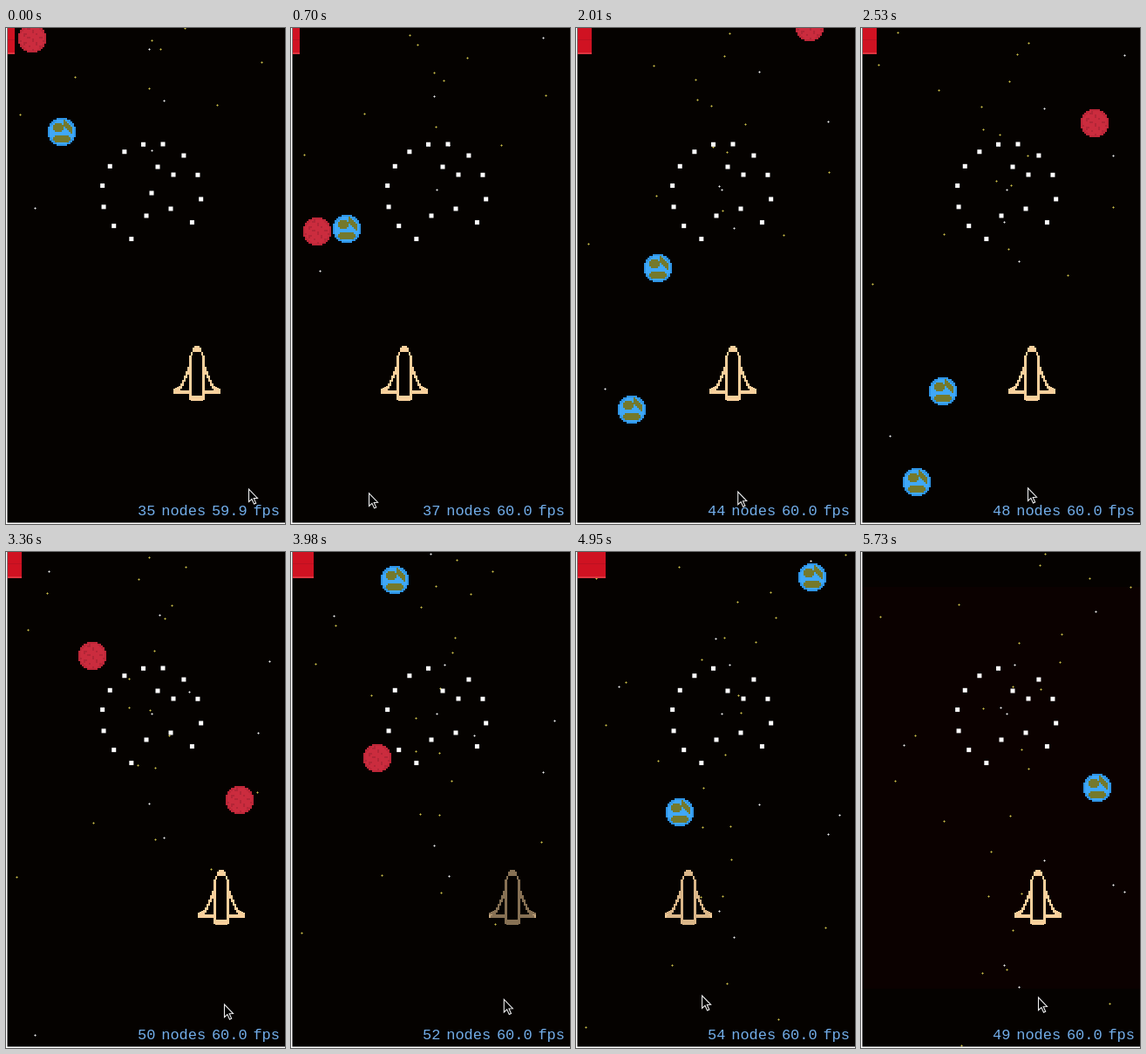
Recreate the animation shown at these times as an HTML page with a canvas. Size 320 px wide and 568 px high, loop 5.83 s.

```html
<!DOCTYPE html>
<html lang="en">
<head>
<meta charset="utf-8">
<title>Space shuttle</title>
<style>
  html, body { margin: 0; width: 100%; height: 100%; overflow: hidden; background: #050200; }
  canvas { display: block; }
</style>
</head>
<body>
<canvas id="stage" width="320" height="568"></canvas>
<script>
const ctx = document.getElementById('stage').getContext('2d');
const LOOP = 5830;
const SHIP_TOP = 364, SHIP_HALF = 27, SHIP_LAG = .15;
const RADIUS = 16, BLINK = .4;

// Key points as [seconds, value]
const POINTER = [[-.15, 219], [0, 278], [.9, 52], [1.245, 140], [1.395, 161], [2.379, 196], [2.529, 191],
  [3.21, 247], [3.36, 250], [3.82, 254], [3.97, 244], [4.45, 108], [4.78, 129], [4.93, 144], [5.57, 203]];
const NODES = [[0, 35], [1.395, 40], [2.529, 48], [3.36, 50], [3.97, 52], [4.93, 54], [5.717, 49]];

// Smooth curve through key points
function curve(t, keys) {
  const last = keys.length - 1;
  if (t >= keys[last][0]) return keys[last][1];
  let i = 0;
  while (t >= keys[i + 1][0]) i++;
  const slope = k => {
    const a = keys[Math.max(k - 1, 0)], b = keys[Math.min(k + 1, last)];
    return (b[1] - a[1]) / (b[0] - a[0]);
  };
  const [t0, v0] = keys[i], [t1, v1] = keys[i + 1];
  const d = t1 - t0, u = (t - t0) / d, w = 1 - u;
  return v0 * w * w * (1 + 2 * u) + v1 * u * u * (3 - 2 * u)
    + d * u * w * (slope(i) * w - slope(i + 1) * u);
}

const pointerX = t => curve(t, POINTER);
const pointerY = t => 521 + 13 * Math.cos((t - 1.2) * Math.PI / 3.8);
const shipX = t => pointerX(t - SHIP_LAG);

// A planet crosses y = 0 at its start time and is lost if it meets the ship.
const planets = [
  ['mars', 30, -.038, 317],
  ['earth', 64, -.75, 158.6],
  ['earth', 94, .982, 269],
  ['mars', 268, 2.011, 210.6],
  ['mars', 99, 2.739, 191.5],
  ['earth', 119, 3.855, 277],
  ['earth', 271, 4.836, 306.6],
].map(([kind, x, start, speed]) => {
  const meet = start + (SHIP_TOP - RADIUS) / speed;
  const hit = Math.abs(shipX(meet) - x) < RADIUS + SHIP_HALF;
  return { kind, x, start, speed, end: hit ? meet : Infinity };
});
const hits = planets.map(p => p.end).filter(isFinite);
const RESET = hits.pop();

// Dots: two arcs of a ring plus a few inside it
const dots = [[174, 159], [192, 168], [189, 207], [161, 215]];
function arc(from, to, count) {
  for (let i = 0; i < count; i++) {
    const a = (from + (to - from) * i / (count - 1)) * Math.PI / 180;
    const r = 57 + 2.5 * Math.sin(a);
    dots.push([167 + r * Math.cos(a), 187 + r * Math.sin(a)]);
  }
}
arc(113, 260, 7);
arc(-48, 37.5, 4);

// Dots that vanish when a falling star stops on them
const caught = [{ x: 167, y: 189, starX: 167, at: .47 }, { x: 180, y: 133, starX: 176, at: 3.96 }];

function seeded(seed) {
  return () => (seed = seed * 16807 % 2147483647) / 2147483647;
}

// Yellow stars drift and gather speed; white ones fall straight.
const random = seeded(4177);
const stars = [];
for (let born = -1.9; born < 5.8; born += .27)
  stars.push({ color: '#cfc24a', born, x: 8 + 304 * random(), drift: 16 * random() - 8, speed: 40 + 8 * random(), pull: 5.6 });
for (let born = -2; born < 5.6; born += .85)
  stars.push({ color: '#f0f0f0', born, x: 20 + 285 * random(), drift: 0, speed: 70 + 45 * random(), pull: 0 });

function rect(color, x, y, w, h) {
  ctx.fillStyle = color;
  ctx.fillRect(x, y, w, h);
}

function drawStar(x, y, color) {
  x = Math.round(x);
  y = Math.round(y);
  ctx.globalAlpha = .55;
  rect(color, x - 1, y, 3, 1);
  rect(color, x, y - 1, 1, 3);
  ctx.globalAlpha = 1;
  rect(color, x, y, 1, 1);
}

const drawDot = ({ x, y }) => rect('#fff', x - 2.5, y - 2.5, 5, 5);

const inOval = (x, y, rx, ry) => (x / rx) ** 2 + (y / ry) ** 2 < 1;
const SURFACE = {
  earth: {
    rim: '#2e94e6', fill: '#40a8f8', spot: '#74792c',
    marked: (x, y) => inOval(x + 4, y + 5, 7, 4.5) || inOval(x, y - 8, 10, 4.5)
      || Math.abs(x - y - 13) < 4 && Math.abs(x - 7) < 6,
  },
  mars: {
    rim: '#bd2738', fill: '#cb2c3e', spot: '#b22637',
    marked: (x, y) => Math.sin(x * .7 + 1) * Math.sin(y * .6 + x * .25) > .55,
  },
};

function drawPlanet({ kind, x, start, speed }, t) {
  const { rim, fill, spot, marked } = SURFACE[kind];
  const top = Math.round(speed * (t - start));
  for (let dy = -RADIUS; dy < RADIUS; dy += 2)
    for (let dx = -RADIUS; dx < RADIUS; dx += 2) {
      const cx = dx + 1, cy = dy + 1, r = Math.hypot(cx, cy);
      if (r > RADIUS) continue;
      rect(r > 14 ? rim : marked(cx, cy) ? spot : fill, x + dx, top + dy, 2, 2);
    }
}

function drawShip(x, alpha) {
  const part = (dx, dy, w, h) => rect('#f8d09c', x + dx, SHIP_TOP + dy, w, h);
  const pair = (dx, dy, w, h) => { part(dx, dy, w, h); part(-dx - w, dy, w, h); };
  ctx.globalAlpha = alpha;
  part(-3, 0, 6, 2);
  part(-5, 2, 10, 5);
  pair(-7, 7, 2, 4);
  pair(-9, 11, 3, 46);
  part(-9, 57, 18, 5);
  part(-7, 62, 14, 1);
  // Wing edge: steps that flatten outwards
  for (let i = 0; i < 8; i++) {
    const y = 24 + 24 * Math.sin(i / 7 * Math.PI / 2);
    pair(-11 - 2 * i, Math.round(y), 2, 9 - Math.round(i * .75));
  }
  pair(-27, 49, 2, 6);
  pair(-27, 51, 18, 4);
  ctx.globalAlpha = 1;
}

function drawPointer(x, y) {
  ctx.beginPath();
  for (const [dx, dy] of [[0, 0], [0, 14.5], [3.4, 11.4], [6, 17], [8.2, 16], [5.7, 10.5], [10, 10.3]])
    ctx.lineTo(x + dx + .5, y + dy);
  ctx.closePath();
  ctx.fillStyle = '#000';
  ctx.strokeStyle = '#eee';
  ctx.lineWidth = 1.1;
  ctx.fill();
  ctx.stroke();
}

function drawBar(level) {
  const w = 8 * level;
  rect('#d01222', 2, 0, w, 30);
  rect('#bc1121', 2, 13, w, 1);
  rect('#de3440', 2, 28, w, 2);
}

function drawStats(t) {
  ctx.font = '17px "Liberation Mono", "Courier New", monospace';
  ctx.wordSpacing = '-3.5px';
  ctx.textAlign = 'right';
  ctx.fillStyle = '#72aeea';
  ctx.fillText(`${Math.round(curve(t, NODES))} nodes ${t ? '60.0' : '59.9'} fps`, 314, 558);
}

function draw(t) {
  rect('#050200', 0, 0, 320, 568);
  if (t >= RESET) rect('#0b0100', 0, 40, 320, 460);

  for (const { color, born, x, drift, speed, pull } of stars) {
    const s = t - born;
    if (s > 0) drawStar(x + drift * s, speed * s + pull * s * s, color);
  }
  for (const dot of caught) {
    drawStar(dot.starX, dot.y - 4 - 95 * Math.max(0, dot.at - t), '#f0f0f0');
    if (t < dot.at) drawDot(dot);
  }
  for (const [x, y] of dots) drawDot({ x, y });
  for (const planet of planets) if (t < planet.end) drawPlanet(planet, t);

  // The ship blinks twice after each hit.
  const past = hits.filter(h => h <= t);
  const since = t - past[past.length - 1];
  drawShip(Math.round(shipX(t)), since < 2 * BLINK ? Math.abs(1 - 2 * (since / BLINK % 1)) : 1);

  if (t < RESET) drawBar(past.length + 1);
  rect('#fff', 0, 0, 1.5, 568);
  rect('#fff', 0, 566.5, 320, 1.5);
  drawStats(t);
  drawPointer(pointerX(t), pointerY(t));
}

// The picture updates about every 87 ms, with one longer hold.
function snap(ms) {
  return ms < 2836
    ? Math.min(31, Math.floor(ms / 87.2)) * 87.2
    : 2836 + Math.floor((ms - 2836) / 87.3) * 87.3;
}

const start = performance.now();
function tick() {
  draw(snap((performance.now() - start) % LOOP) / 1000);
  requestAnimationFrame(tick);
}
tick();
</script>
</body>
</html>
```
